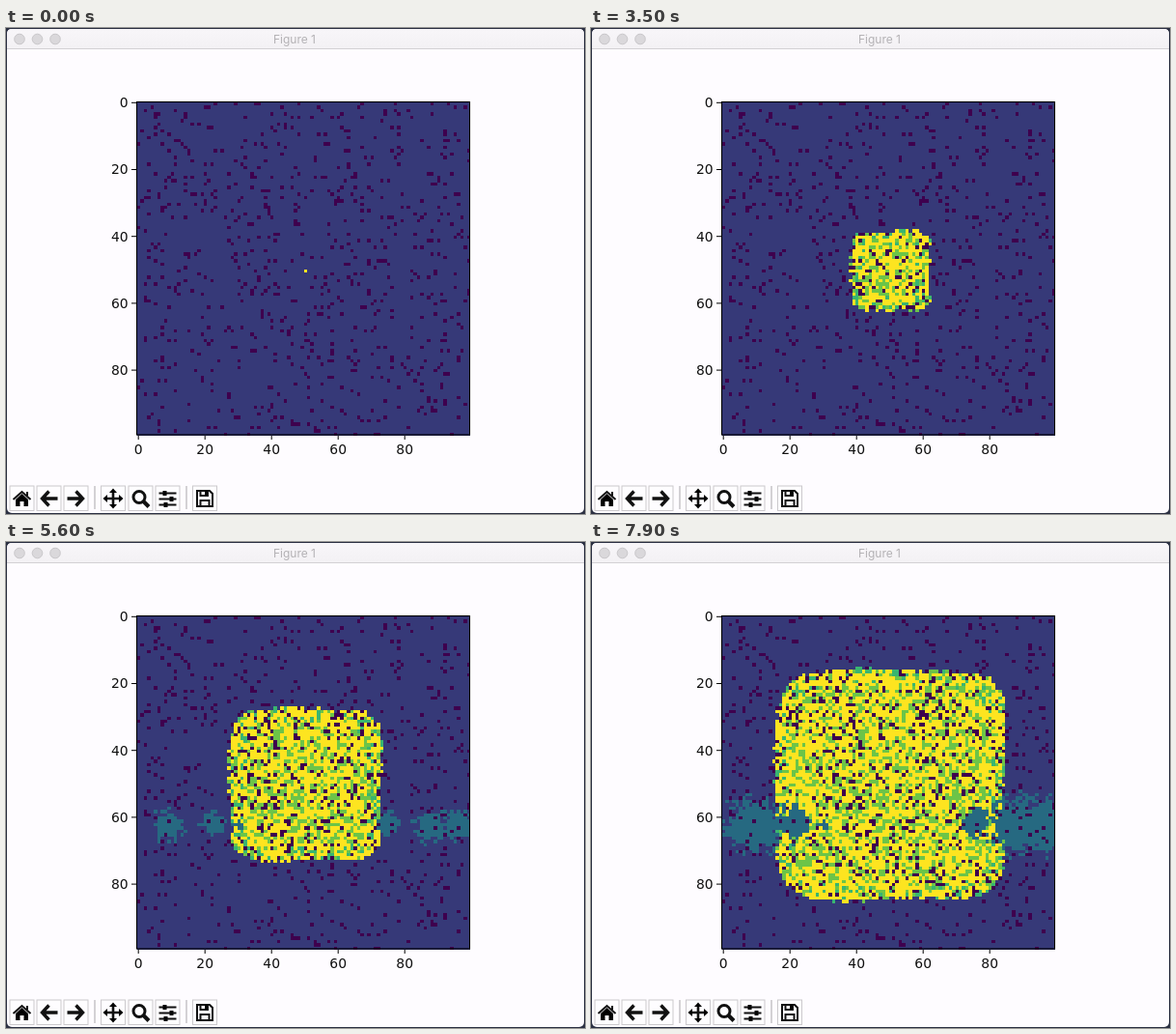
An HTML page with a canvas that plays this animation: 600 by 503 pixels, repeating every 8000 ms.

```html
<!DOCTYPE html>
<html>
<head>
<meta charset="utf-8">
<style>
html, body { margin: 0; width: 600px; height: 503px; overflow: hidden; background: #2b3042; }
svg, canvas { position: absolute; left: 0; top: 0; display: block; }
canvas { left: 135.5px; top: 76.5px; width: 345px; height: 345px; image-rendering: pixelated; }
.tick { font: 13.9px "DejaVu Sans", sans-serif; fill: #111; }
.title { font: 12px Inter, sans-serif; fill: #b4b2b5; }
.button { fill: #fefdff; stroke: #cbc9cc; }
.line { fill: none; stroke: #111; stroke-width: 2; }
</style>
</head>
<body>
<svg width="600" height="503">
  <defs>
    <linearGradient id="bar" x2="0" y2="1"><stop stop-color="#f8f6f9"/><stop offset="1" stop-color="#f3f1f4"/></linearGradient>
  </defs>
  <rect x="1" y="1" width="598" height="501" rx="5" fill="#fefcff"/>
  <path d="M1 21V6Q1 1 6 1H594Q599 1 599 6V21Z" fill="url(#bar)"/>
  <path d="M1 21.5H599" stroke="#d3d1d4"/>
  <g fill="#dad8db" stroke="#c9c7ca">
    <circle cx="14" cy="11.5" r="5.3"/><circle cx="32.5" cy="11.5" r="5.3"/><circle cx="51" cy="11.5" r="5.3"/>
  </g>
  <text class="title" x="299" y="16" text-anchor="middle">Figure 1</text>
  <g id="axes"></g>
  <path d="M92 474V498M187 474V498" stroke="#a9a7aa"/>
  <g id="tools"></g>
</svg>
<canvas id="grid" width="100" height="100"></canvas>
<svg width="600" height="503"><rect x="135.5" y="76.5" width="345" height="344.5" fill="none" stroke="#000" stroke-width="1.1"/></svg>
<script>
const N = 100, LOOP = 8000, STEP = 100;
const EMPTY = [62, 0, 78], TREE = [54, 57, 120], TEAL = [38, 105, 129];
const FRESH = [57, 181, 112], GREEN = [108, 196, 72], YELLOW = [253, 228, 32];

// Axis ticks and labels
let axes = '';
for (let v = 0; v < N; v += 20) {
  const x = 137.2 + v * 3.45, y = 77.3 + v * 3.46;
  axes += `<path d="M${x} 421v5M135 ${y}h-5" stroke="#000"/>
    <text class="tick" x="${x}" y="440.6" text-anchor="middle">${v}</text>
    <text class="tick" x="126.6" y="${y + 4.8}" text-anchor="end">${v}</text>`;
}
document.getElementById('axes').innerHTML = axes;

// Toolbar icons, centred on their buttons
const arrow = '<path class="line" style="stroke-width:3.4" d="M9 0H-6M0-7.5L-7 0L0 7.5"/>';
const icons = [
  [16.5, '<path d="M-6.5 1L0-5L6.5 1V8H2V3H-2V8H-6.5Z"/><path class="line" d="M-9 1L0-7L9 1M5.5-7V-3"/>'],
  [44.5, arrow],
  [72.5, `<g transform="scale(-1 1)">${arrow}</g>`],
  [111, '<path class="line" style="stroke-width:2.6" d="M-8 0H8M0-8V8"/>' +
    [0, 90, 180, 270].map(a => `<path transform="rotate(${a})" d="M0-10.5L4-6H-4Z"/>`).join('')],
  [139.5, '<circle class="line" style="stroke-width:3" cx="-1.5" cy="-1.5" r="6"/><path class="line" style="stroke-width:4" d="M3 3L8.5 8.5"/>'],
  [167.5, '<path class="line" d="M-9-5.5H9M-9 .5H9M-9 6.5H9"/><path d="M-5-8h4v5h-4ZM2-2h4v5h-4ZM-4 4h4v5h-4Z"/>'],
  [206, '<path class="line" d="M-8-8H5L8-5V8H-8ZM-4.5 8V2H4.5V8M-4.5-8V-3H3V-8"/><path d="M0-8h3v5h-3Z"/>']
];
document.getElementById('tools').innerHTML = icons.map(([x, art]) =>
  `<g transform="translate(${x} 487)"><rect class="button" x="-12.5" y="-13" width="25" height="25.5"/>${art}</g>`).join('');

let seed = 20;
function random() {
  seed = seed + 0x6D2B79F5 | 0;
  let t = Math.imul(seed ^ seed >>> 15, 1 | seed);
  t = t + Math.imul(t ^ t >>> 7, 61 | t) ^ t;
  return ((t ^ t >>> 14) >>> 0) / 4294967296;
}

// Teal patches: column, row, final radius
const patches = [[9, 62.5, 8.5], [22.5, 61.5, 7], [30, 62, 4], [74.5, 61.5, 7], [88, 62, 9], [96, 62, 8.5]];

// Time at which the rounded square front reaches a cell; it gains about 5.2 cells a second
function fireTime(x, y) {
  const dx = x - 50, dy = y - 50;
  if (!dx && !dy) return 0;
  const d = (Math.abs(dx) ** 6 + Math.abs(dy) ** 6) ** (1 / 6);
  const wave = 0.012 * d * (1 + Math.sin(5 * Math.atan2(dy, dx) + 1));
  return 2100 + (d + wave + random() * 0.9 - 5.3) / 0.005175;
}

function tealTime(x, y) {
  const rough = 0.75 + random() * 0.8;
  return Math.min(...patches.map(([px, py, r]) =>
    4100 + 3800 * (Math.hypot(x - px, y - py) / r * rough) ** 1.5));
}

const cells = Array.from({ length: N * N }, (_, i) => {
  const x = i % N, y = Math.floor(i / N), centre = x === 50 && y === 50;
  const kind = random();
  return {
    empty: !centre && random() < 0.073,
    fire: fireTime(x, y),
    teal: tealTime(x, y),
    young: random() < 0.45,
    burnt: centre || kind < 0.6 ? YELLOW : kind < 0.93 ? GREEN : EMPTY
  };
});

function colour(c, t) {
  if (c.empty) return EMPTY;
  if (t >= c.teal && c.teal < c.fire) return TEAL;
  if (t < c.fire) return TREE;
  return c.young && c.burnt === GREEN && t - c.fire < 900 ? FRESH : c.burnt;
}

const ctx = document.getElementById('grid').getContext('2d');
const image = ctx.createImageData(N, N);
let last = -1;
function draw() {
  const t = Math.floor(performance.now() % LOOP / STEP) * STEP;
  if (t !== last) {
    cells.forEach((c, i) => image.data.set([...colour(c, t), 255], i * 4));
    ctx.putImageData(image, 0, 0);
    last = t;
  }
  requestAnimationFrame(draw);
}
draw();
</script>
</body>
</html>
```
